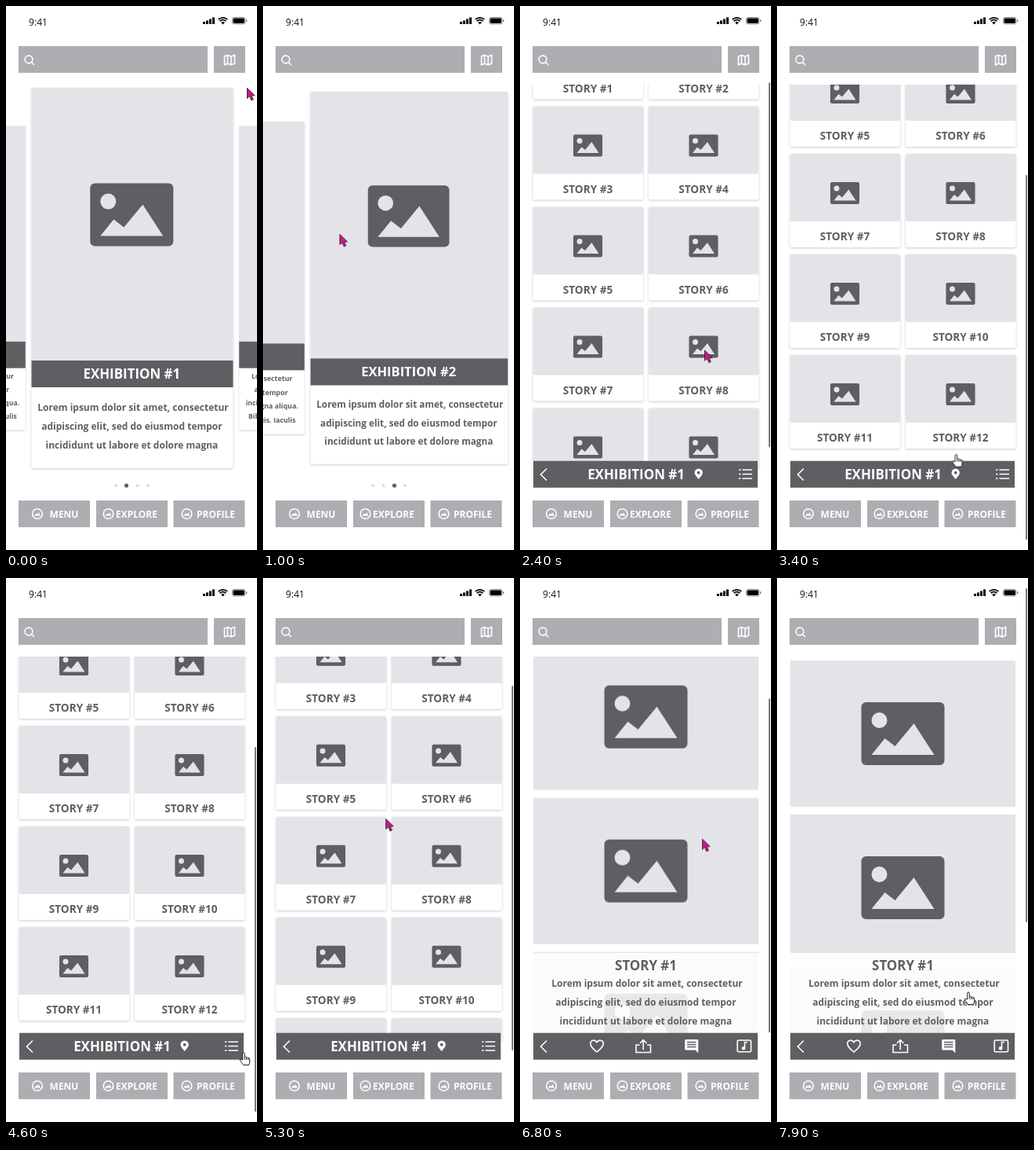
Recreate the animation shown at these times as an HTML page. Size 320 by 692 pixels, loop 8 s.

```html
<!DOCTYPE html>
<html lang="en">
<head>
<meta charset="utf-8">
<title>Exhibition browser wireframe</title>
<style>
@property --p { syntax: "<number>"; inherits: true; initial-value: 0; }

html, body { margin: 0; width: 100%; height: 100%; overflow: hidden; background: #fff; }
svg.stage { display: block; width: 100%; height: 100%; }
text { font: bold 12px "Open Sans", "Noto Sans", sans-serif; fill: #5f5e62; text-anchor: middle; white-space: pre; }
.title { font-size: 16.9px; }
.label { font-size: 13.6px; }
.small { font-size: 10.8px; }
.clock { font-weight: 400; fill: #111; }
.light { fill: #fff; }
.mid { fill: #aeadb2; }
.pale { fill: #e4e3e8; }
.dark { fill: #5f5e62; }
.line { fill: none; stroke: #fff; stroke-width: 1.6; }
.paper { fill: #fff; filter: drop-shadow(0 1px 1.5px #0003); }

.home, .list, .story, .deck, .dot, .rows, .photos, .thumb, .cursor, .arrow, .hand {
  animation: 8s linear infinite;
}
.home { animation-name: home; animation-timing-function: step-end; }
.list { animation-name: list; animation-timing-function: step-end; }
.story { animation-name: story; animation-timing-function: step-end; }
@keyframes home { 0% { visibility: visible } 25%, 100% { visibility: hidden } }
@keyframes list { 0% { visibility: hidden } 25% { visibility: visible } 78.75%, 100% { visibility: hidden } }
@keyframes story { 0% { visibility: hidden } 78.75%, 100% { visibility: visible } }

/* Carousel: --p is the slide in focus, --d each card's distance from it */
.deck { animation-name: swipe; }
@keyframes swipe {
  0%, 2.5% { --p: 0 }
  7.5% { --p: .9 }
  9.4%, 11.25% { --p: 1 }
  12.5% { --p: .896 }
  17.5% { --p: .1 }
  18.75%, 100% { --p: 0 }
}
.card {
  --o: calc(var(--i) - var(--p));
  --d: min(1, max(var(--o), -1 * var(--o)));
  transform: translate(calc(161px + var(--o) * 239px), 346px) scale(calc(1 - .2 * var(--d)));
}
.band { transform-origin: 0 121px; transform: scaleY(calc(1 + .24 * var(--d))); }
.near { opacity: calc((.5 - var(--d)) * 10); }
.far { opacity: calc((var(--d) - .5) * 10); }
.dot { animation-name: dot; animation-timing-function: step-end; }
@keyframes dot {
  0% { transform: none }
  5.3% { transform: translateX(14px) }
  15%, 100% { transform: none }
}

.rows { animation-name: rows; }
@keyframes rows {
  0%, 26.25% { transform: translateY(0) }
  30% { transform: translateY(-104px) }
  35%, 63.125% { transform: translateY(-300px) }
  71.25%, 100% { transform: translateY(0) }
}
.list .thumb { animation-name: listThumb; }
@keyframes listThumb {
  0%, 26.25% { transform: translateY(0) }
  30% { transform: translateY(84px) }
  35%, 63.125% { transform: translateY(202px) }
  71.25%, 100% { transform: translateY(0) }
}
.photos { animation-name: photos; }
@keyframes photos {
  0%, 81.25% { transform: translateY(0) }
  85% { transform: translateY(-217px) }
  90% { transform: translateY(-355px) }
  91.25%, 92.5% { transform: translateY(-372px) }
  97.5%, 100% { transform: translateY(0) }
}
.story .thumb { animation-name: storyThumb; }
@keyframes storyThumb {
  0%, 81.25% { transform: translateY(0) }
  85% { transform: translateY(140px) }
  90% { transform: translateY(229px) }
  91.25%, 92.5% { transform: translateY(240px) }
  97.5%, 100% { transform: translateY(0) }
}

.cursor { animation-name: move; }
@keyframes move {
  0% { transform: translate(307px, 103px) }
  2.5% { transform: translate(300px, 285px) }
  7.5% { transform: translate(85px, 290px) }
  11.25% { transform: translate(72px, 290px) }
  12.5% { transform: translate(97px, 290px) }
  17.5% { transform: translate(287px, 295px) }
  22.5% { transform: translate(240px, 420px) }
  26.25% { transform: translate(236px, 542px) }
  30% { transform: translate(235px, 438px) }
  35% { transform: translate(235px, 242px) }
  43%, 50% { transform: translate(228px, 592px) }
  55%, 58% { transform: translate(303px, 604px) }
  63.125% { transform: translate(160px, 190px) }
  71.25% { transform: translate(150px, 490px) }
  76.25%, 78.75% { transform: translate(121px, 170px) }
  81.25% { transform: translate(232px, 549px) }
  85% { transform: translate(232px, 332px) }
  91.25%, 92.5% { transform: translate(240px, 167px) }
  97.5%, 100% { transform: translate(244px, 527px) }
}
.arrow { animation-name: arrow; animation-timing-function: step-end; }
.hand { animation-name: hand; animation-timing-function: step-end; }
@keyframes arrow {
  0% { opacity: 1 } 36.25% { opacity: 0 } 62.5% { opacity: 1 } 71.25% { opacity: 0 }
  81.25% { opacity: 1 } 97.5%, 100% { opacity: 0 }
}
@keyframes hand {
  0% { opacity: 0 } 36.25% { opacity: 1 } 62.5% { opacity: 0 } 71.25% { opacity: 1 }
  81.25% { opacity: 0 } 97.5%, 100% { opacity: 1 }
}
</style>
</head>
<body>
<svg class="stage" viewBox="0 0 320 692">
  <defs>
    <g id="picture">
      <rect class="dark" x="-53" y="-40" width="106" height="80" rx="6"/>
      <circle class="pale" cx="-30" cy="-17" r="10"/>
      <path class="pale" d="M-40 27L-23 6L-10 16L14-13L40 27Z"/>
    </g>
    <g id="badge">
      <circle class="line" r="6.3" stroke-width="1.2"/>
      <path class="light" d="M-4 2.5L-1.8-.8L-.3.8L1.6-1.8L4 2.5Z"/>
    </g>
    <g id="bar">
      <rect class="dark" x="17" y="578.7" width="286" height="34"/>
      <path class="line" d="M34 588.5L26.5 596L34 603.5" stroke-width="2"/>
    </g>
    <clipPath id="window"><rect y="100" width="316" height="490"/></clipPath>
  </defs>

  <text class="clock" x="41" y="24.5">9:41</text>
  <g fill="#000">
    <path d="M251 20h3v3h-3zM255 18.5h3v4.5h-3zM259 16.5h3v6.5h-3zM263 14.5h3v8.5h-3z"/>
    <path d="M276.5 23.5L274.2 21A3.4 3.4 0 0 1 278.8 21Z"/>
    <path d="M272.6 19.3A5.6 5.6 0 0 1 280.4 19.3M270.7 17.1A8.4 8.4 0 0 1 282.3 17.1" fill="none" stroke="#000" stroke-width="1.7"/>
    <rect x="288.5" y="14.5" width="16.5" height="8.5" rx="2.3" fill="none" stroke="#777" stroke-width=".8"/>
    <rect x="289.5" y="15.5" width="14.5" height="6.5" rx="1.4"/>
    <rect x="306" y="17.2" width="1.3" height="3" rx=".6" fill="#777"/>
  </g>

  <rect class="mid" x="16" y="51" width="241" height="34"/>
  <g class="line"><circle cx="29" cy="68" r="4.9"/><path d="M32.5 71.5L36 75"/></g>
  <rect class="mid" x="265" y="51" width="40" height="34"/>
  <path class="line" stroke-width="1.3" d="M278.5 64L282.5 62.5L287 64.2L291.5 62.5V73.2L287 74.8L282.5 73.2L278.5 74.8ZM282.5 62.5V73.2M287 64.2V74.8"/>

  <g class="home">
    <g class="deck" id="deck"></g>
    <g fill="#dedde1">
      <circle cx="140" cy="610" r="2"/><circle cx="153.5" cy="610" r="2"/>
      <circle cx="167.5" cy="610" r="2"/><circle cx="181" cy="610" r="2"/>
    </g>
    <circle class="dot dark" cx="153.5" cy="610" r="2.6"/>
  </g>

  <g class="list">
    <g clip-path="url(#window)"><g class="rows" id="rows"></g></g>
    <use href="#bar"/>
    <text class="title light" x="148" y="602">EXHIBITION #1</text>
    <path class="light" fill-rule="evenodd" d="M227.7 602C225 598.5 222.5 596 222.5 593.7A5.2 5.2 0 0 1 232.9 593.7C232.9 596 230.4 598.5 227.7 602ZM227.7 591.8a1.9 1.9 0 1 0 .01 0Z"/>
    <path class="line" d="M279 590h2.5M279 595.5h2.5M279 601h2.5M283.5 590h12.5M283.5 595.5h12.5M283.5 601h12.5" stroke-width="1.7"/>
    <rect class="thumb" x="317" y="13" width="2" height="464" rx="1" fill="#77767a"/>
  </g>

  <g class="story">
    <g clip-path="url(#window)"><g class="photos" id="photos"></g></g>
    <rect x="16" y="477" width="289" height="102" fill="#fff" fill-opacity=".86"/>
    <text class="title" x="160.5" y="499">STORY #1</text>
    <g id="blurb"></g>
    <use href="#bar"/>
    <path class="line" d="M98 603C92.5 598.5 89.8 596 89.8 592.3C89.8 587.6 95.7 586.6 98 590.6C100.3 586.6 106.2 587.6 106.2 592.3C106.2 596 103.5 598.5 98 603Z"/>
    <path class="line" stroke-width="1.8" d="M152.5 594H148V603.5H166.5V594H162M157.2 600V588M153 591.8L157.2 587.6L161.4 591.8"/>
    <path class="light" d="M211.5 587H226a1.3 1.3 0 0 1 1.3 1.3V604.3L223.5 600.5H211.5a1.3 1.3 0 0 1-1.3-1.3V588.3A1.3 1.3 0 0 1 211.5 587Z"/>
    <path d="M213 590.5h11.5M213 593.5h11.5M213 596.5h11.5" stroke="#5f5e62" stroke-width="1.4"/>
    <rect class="line" x="277.2" y="588" width="17.3" height="14.7" rx="1.5"/>
    <path class="line" d="M286.5 598V590.5H290"/>
    <circle class="light" cx="285" cy="598.2" r="2.3"/>
    <rect class="thumb" x="317" y="13" width="2" height="425" rx="1" fill="#77767a"/>
  </g>

  <g id="tabs"></g>

  <g class="cursor">
    <path class="arrow" d="M.5.5V13.5L3.5 10.8L5.8 16L8.3 14.9L6 9.9H10.2Z" fill="#d8128f" stroke="#222" stroke-width=".9"/>
    <path class="hand" d="M-1.3 9V1.2A1.3 1.3 0 0 1 1.3 1.2V5.5Q2.7 4.5 3.6 6Q5 5.2 5.8 6.7Q7.7 6.2 7.7 8.2V11Q7.7 13 6.5 15.5H-.5Q-2.5 12.5-4.6 9.8Q-4.9 7.8-3 8.3ZM1.3 5.5V8.8M3.6 6V9M5.8 6.7V9.2" fill="#fff" stroke="#222" stroke-width="1" stroke-linejoin="round"/>
  </g>
</svg>

<script>
const fill = (id, parts) => document.getElementById(id).innerHTML = parts.join("");
const range = n => [...Array(n).keys()];
const lines = (list, x, y, step, cls = "") =>
  list.map((s, k) => `<text class="${cls}" x="${x}" y="${y + k * step}">${s}</text>`).join("");

// Wrapped lines keep their trailing space, which shifts their centre
const copy = [
  "Lorem ipsum dolor sit amet, consectetur",
  "adipiscing elit, sed do eiusmod tempor&#160;",
  "incididunt ut labore et dolore magna&#160;"
];
const longCopy = [copy[0], copy[1], copy[2] + "aliqua.",
  "Bibendum est ultricies integer quis. Iaculis"];

fill("deck", [-1, 0, 1, 2].map(i => `
  <g class="card" style="--i:${i}">
    <rect class="paper" x="-128.5" y="-242" width="257" height="484" rx="2"/>
    <rect class="pale" x="-128.5" y="-242" width="257" height="347"/>
    <use href="#picture" transform="translate(-.7 -80.4)"/>
    <rect class="band dark" x="-128.5" y="105" width="257" height="34"/>
    <text class="title light" x="-.7" y="128">EXHIBITION #${(i + 4) % 4 + 1}</text>
    <g class="near">${lines(copy, 1, 169, 24)}</g>
    <g class="far">${lines(longCopy, .5, 160, 21.2, "small")}</g>
  </g>`));

fill("rows", range(12).map(n => `
  <g transform="translate(${n % 2 ? 164 : 16.5} ${104 + (n >> 1) * 128})">
    <rect class="paper" width="140.5" height="119" rx="2"/>
    <rect class="pale" width="140.5" height="86" rx="2"/>
    <use href="#picture" transform="translate(70 50) scale(.35)"/>
    <text class="label" x="70" y="110">STORY #${n + 1}</text>
  </g>`));

fill("photos", range(4).map(n => `
  <g transform="translate(17 ${105 + n * 196})">
    <rect class="pale" width="287" height="186"/>
    <use href="#picture" transform="translate(143.5 93)"/>
  </g>`));

fill("blurb", [lines(copy, 162, 520, 24)]);

fill("tabs", [["MENU", 16, 40, 74], ["EXPLORE", 115, 130.5, 166.5], ["PROFILE", 213.5, 230.5, 267.5]]
  .map(([name, x, icon, mid]) => `
    <rect class="mid" x="${x}" y="629" width="91" height="34"/>
    <use href="#badge" x="${icon}" y="646"/>
    <text class="light" x="${mid}" y="650.5">${name}</text>`));
</script>
</body>
</html>
```
